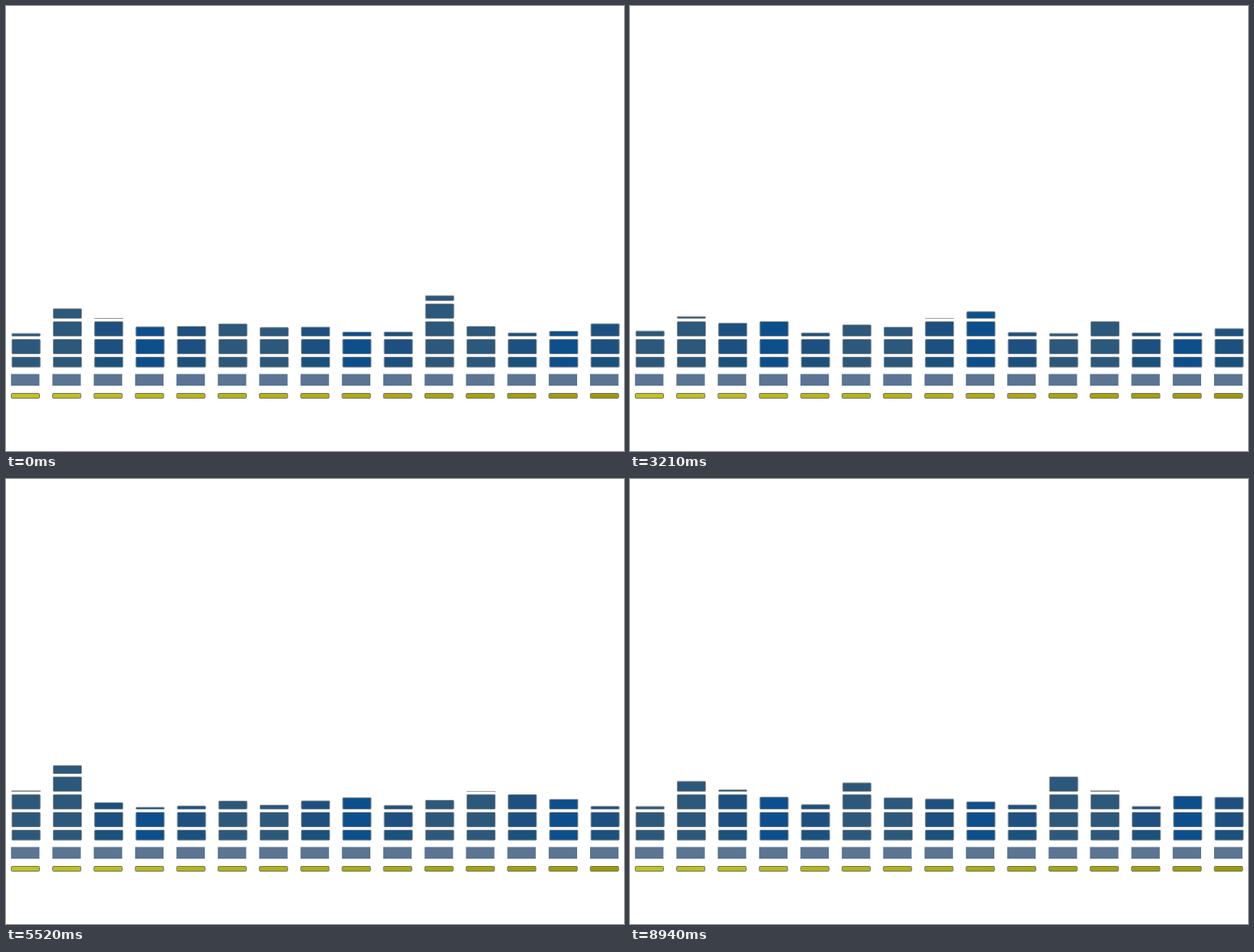
An HTML page with a canvas that plays this animation: 765x552 px, repeating every 9000 ms.

```html
<!DOCTYPE html>
<html lang="en">
<head>
<meta charset="utf-8">
<title>Equalizer</title>
<style>
  html, body { margin: 0; width: 100%; height: 100%; overflow: hidden; background: #fff; }
  canvas { display: block; }
</style>
</head>
<body>
<canvas id="stage" width="765" height="552"></canvas>
<script>
const ctx = document.getElementById('stage').getContext('2d');
const LOOP = 9000, STEP = 30, LAST = 8940;
const BARS = 15, PITCH = 51.2, BEATS = 72;
const REST = 402, FLOOR = 413, CEILING = 338;
const ROW = 22, BLOCK = 19;

// Lasting shape of the spectrum
const humps = [
  { bar: 1.2, rise: 22, width: 0.7 },
  { bar: 5, rise: 8, width: 0.8 },
  { bar: 7.7, rise: 13, width: 1 },
  { bar: 11, rise: 6, width: 0.8 }
];

// Slow swells of single bars
const swells = [
  { bar: 1, time: 5500, rise: 28, width: 1400 },
  { bar: 2, time: 0, rise: 10, width: 300 },
  { bar: 8, time: 2600, rise: 26, width: 900 },
  { bar: 8, time: 0, rise: -12, width: 700 },
  { bar: 10, time: LAST, rise: 34, width: 200 },
  { bar: 11, time: 6390, rise: 15, width: 300 }
];

const palette = ['#2c587b', '#1d5080', '#0d4f8c'];
const toneOf = bar => [0, 0, 1, 2, 1][bar % 5];

const mix = (a, b, u) => a + (b - a) * u;
const bell = (d, width) => Math.exp(-((d / width) ** 2));
const sum = (list, value) => list.reduce((total, item) => total + value(item), 0);

function random(a, b) {
  const v = Math.sin(a * 127.1 + b * 311.7) * 43758.5453;
  return v - Math.floor(v);
}

function loopDistance(a, b) {
  const d = Math.abs(a - b);
  return Math.min(d, LOOP - d);
}

// Mostly quiet, with an occasional upward peak
function bounce(bar, t) {
  const beat = t / LOOP * BEATS + bar * 0.37, i = Math.floor(beat), f = beat - i;
  const peak = k => 34 * random(bar + 1, k % BEATS) ** 5;
  return mix(peak(i), peak(i + 1), f * f * (3 - 2 * f)) - 5;
}

function barTop(bar, t) {
  const shape = sum(humps, h => h.rise * bell(bar - h.bar, h.width));
  const swell = sum(swells.filter(s => s.bar === bar),
    s => s.rise * bell(loopDistance(t, s.time), s.width));
  const top = REST - shape - swell - bounce(bar, t);
  return Math.max(CEILING, Math.min(FLOOR, top));
}

function block(x, y, h, fill, edge) {
  if (h < 2) {
    ctx.fillStyle = edge;
    ctx.fillRect(x, y, 36, h);
    return;
  }
  ctx.fillStyle = fill;
  ctx.strokeStyle = edge;
  ctx.beginPath();
  ctx.roundRect(x + 0.5, y + 0.5, 35, h - 1, 1);
  ctx.fill();
  ctx.stroke();
}

function drawBar(bar, t) {
  const x = 6 + bar * PITCH, top = barTop(bar, t);
  const tone = toneOf(bar), fill = palette[tone], edge = '#858d91';

  for (let y = FLOOR; y + BLOCK > top; y -= ROW) {
    const start = Math.max(y, top);
    block(x + 0.8, start, y + BLOCK - start, fill, edge);
  }
  block(x + 0.8, FLOOR + ROW, 13.5, tone === 1 ? '#1a527d' : fill, edge);

  ctx.fillStyle = '#5b7592';
  ctx.fillRect(x + 0.2, 456.5, 35.2, 14.5);

  const u = bar / (BARS - 1);
  const yellow = `rgb(${mix(196, 160, u)},${mix(192, 152, u)},${mix(34, 10, u)})`;
  block(x, 480, 7, yellow, '#6b7868');
}

function draw(now) {
  const t = Math.min(LAST, Math.floor(now % LOOP / STEP) * STEP);
  ctx.fillStyle = '#fff';
  ctx.fillRect(0, 0, 765, 552);
  for (let bar = 0; bar < BARS; bar++) drawBar(bar, t);
}

let begin;
function tick(now) {
  begin ??= now;
  draw(now - begin);
  requestAnimationFrame(tick);
}
requestAnimationFrame(tick);
</script>
</body>
</html>
```
